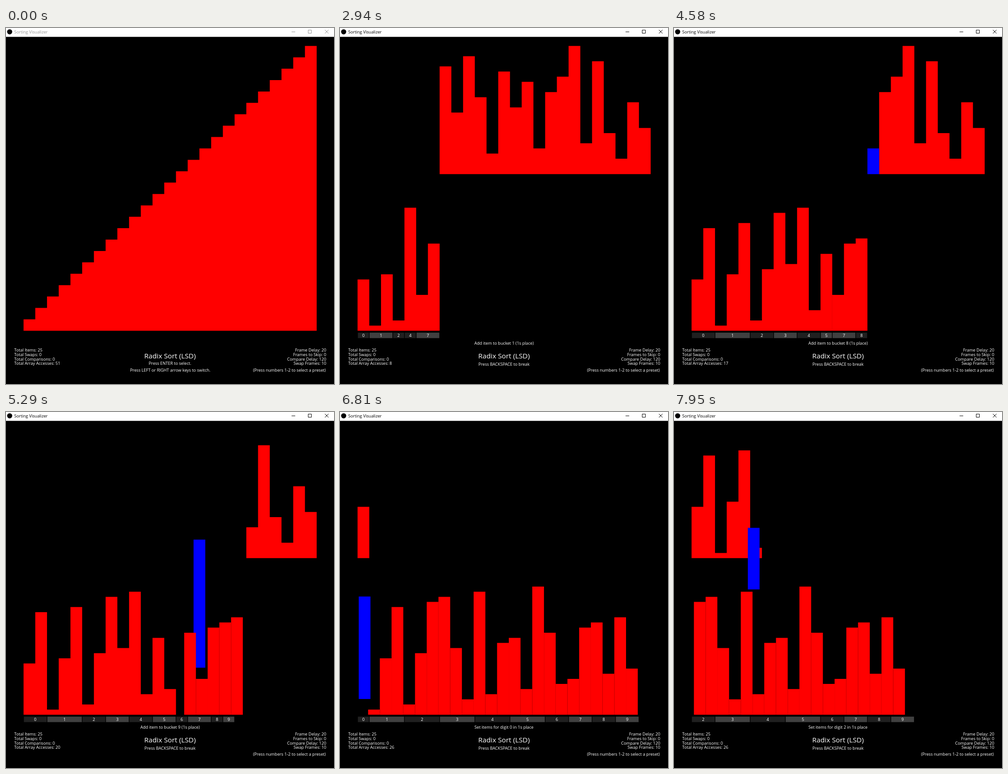
These frames come from a looping animation (719x779 px, 7990 ms). An HTML page with a canvas:

```html
<!DOCTYPE html>
<html lang="en">
<head>
<meta charset="utf-8">
<title>Sorting Visualizer</title>
<style>
html, body { margin: 0; width: 100%; height: 100%; overflow: hidden; background: #000; }
canvas { display: block; }
</style>
</head>
<body>
<canvas id="stage" width="719" height="779"></canvas>
<script>
const ctx = document.getElementById('stage').getContext('2d');
const LOOP = 7990, SHUFFLE_AT = 700, SORT_AT = 1560;
const ADD = { start: 1547, tick: 16.775 }, SET = { start: 6580, tick: 17 };
const TICKS = 12, MOVE_STEPS = 10;
const LEFT = 38.5, SLOT = 25.7, TOP = 39.2, FLOOR = 662.4;
const FULL = (FLOOR - TOP) / 25, HALF = FULL * 0.45, SHELF = TOP + HALF * 25;
const RED = '#f00', BLUE = '#00f';

const items = [7, 10, 17, 1, 2, 24, 11, 21, 12, 23, 15, 4, 20,
  13, 18, 5, 16, 19, 25, 6, 22, 8, 3, 14, 9];
const ordered = items.map((_, i) => i + 1);
const digit = v => v % 10;
const byDigit = list => [...list].sort((a, b) => digit(a) - digit(b));
const buckets = byDigit(items);
const lerp = (a, b, q) => a + (b - a) * q;
const clamp = (v, lo, hi) => Math.min(hi, Math.max(lo, v));

function text(str, x, y, align = 'left', size = 9.15, color = '#fff') {
  ctx.font = `${size}px "Open Sans", "Noto Sans", sans-serif`;
  ctx.textAlign = align;
  ctx.fillStyle = color;
  ctx.fillText(str, x, y);
}

// One path for the whole run, so that neighbours join without seams.
function bars(values, slot, base, unit = HALF, color = RED) {
  ctx.fillStyle = color;
  ctx.beginPath();
  values.forEach((v, i) =>
    ctx.rect(LEFT + (slot + i) * SLOT, base - v * unit, SLOT, v * unit));
  ctx.fill();
}

// Bars between two slots are painted one by one and show fine seams.
function slidingBars(values, slot, base) {
  if (Number.isInteger(slot)) bars(values, slot, base);
  else values.forEach((v, i) => bars([v], slot + i, base));
}

function bucketLabels(list) {
  for (let d = 0; d < 10; d++) {
    const first = list.findIndex(v => digit(v) === d);
    if (first < 0) continue;
    const width = list.filter(v => digit(v) === d).length * SLOT;
    const x = LEFT + first * SLOT;
    ctx.fillStyle = d % 2 ? '#404040' : '#202020';
    ctx.fillRect(x + 0.7, 666.6, width - 1.4, 12);
    text(d, x + width / 2, 676, 'center');
  }
}

function titleBar(t) {
  const fade = t < 70 ? 0 : clamp((Math.floor((t - 70) / 48.5) + 1) / 8, 0, 1);
  const shade = Math.round(lerp(150, 0, fade));
  const color = `rgb(${shade},${shade},${shade})`;
  ctx.fillStyle = '#fff';
  ctx.fillRect(0, 0, 719, 19.4);
  ctx.fillStyle = '#000';
  ctx.beginPath();
  ctx.arc(8, 8.3, 5.6, 0, 7);
  ctx.fill();
  text('Sorting Visualizer', 18, 12, 'left', 9.15, color);
  ctx.strokeStyle = color;
  ctx.lineWidth = 1;
  ctx.beginPath();
  ctx.moveTo(626, 8.5); ctx.lineTo(634, 8.5);
  ctx.rect(662.5, 4.5, 7, 7);
  ctx.moveTo(699, 4); ctx.lineTo(707, 12);
  ctx.moveTo(707, 4); ctx.lineTo(699, 12);
  ctx.stroke();
}

function footer(accesses, sorting, message) {
  const rows = [708.4, 718, 727.6, 737];
  ['Total Items: 25', 'Total Swaps: 0', 'Total Comparisons: 0', `Total Array Accesses: ${accesses}`]
    .forEach((s, i) => text(s, 18, rows[i]));
  ['Frame Delay: 20', 'Frames to Skip: 0', 'Compare Delay: 120', 'Swap Frames: 10']
    .forEach((s, i) => text(s, 702, rows[i], 'right'));
  text('(Press numbers 1-2 to select a preset)', 701, 751.5, 'right');
  text('Radix Sort (LSD)', 359.5, 723, 'center', 15.3);
  if (sorting) {
    text(message, 359.5, 693, 'center');
    text('Press BACKSPACE to break', 359.5, 739, 'center');
  } else {
    text('Press ENTER to select.', 359.5, 737, 'center');
    text('Press LEFT or RIGHT arrow keys to switch.', 360, 751.5, 'center');
  }
}

function progress(phase, t) {
  const ticks = Math.floor((t - phase.start) / phase.tick);
  const step = ticks % TICKS;
  return {
    index: Math.floor(ticks / TICKS),
    q: Math.min(step, MOVE_STEPS) / MOVE_STEPS,
    done: step > MOVE_STEPS
  };
}

function addPhase(t) {
  const { index, q, done } = progress(ADD, t);
  const moving = items[index];
  const next = byDigit(items.slice(0, index + 1));
  const place = next.indexOf(moving);
  bars(items.slice(index + 1), index + 1, SHELF);
  if (done) bars(next, 0, FLOOR);
  else {
    bars(next.slice(0, place), 0, FLOOR);
    bars([moving], lerp(index, place, q), lerp(SHELF, FLOOR, q), HALF, BLUE);
    slidingBars(next.slice(place + 1), place + q, FLOOR);
  }
  bucketLabels(done ? next : next.filter(v => v !== moving));
  const latest = done ? moving : items[index - 1];
  footer(index + 2, true, latest
    ? `Add item to bucket ${digit(latest)} (1s place)`
    : 'Set items for digit 2 in 10s place');
}

function setPhase(t) {
  const { index, q, done } = progress(SET, t);
  const placed = done ? index + 1 : index;
  slidingBars(buckets.slice(index + 1), 1 - q, FLOOR);
  bars(buckets.slice(0, placed), 0, SHELF);
  if (!done) bars([buckets[index]], lerp(0, index, q), lerp(FLOOR, SHELF, q), HALF, BLUE);
  bucketLabels(buckets.slice(placed));
  const latest = buckets[placed - 1];
  footer(26, true, latest
    ? `Set items for digit ${digit(latest)} in 1s place`
    : 'Add item to bucket 9 (1s place)');
}

function draw(t) {
  ctx.fillStyle = '#000';
  ctx.fillRect(0, 0, 719, 779);
  titleBar(t);
  if (t < SORT_AT) {
    const shuffled = t >= SHUFFLE_AT;
    bars(shuffled ? items : ordered, 0, FLOOR, FULL);
    footer(shuffled ? 0 : 51, false);
  } else if (t < SET.start) addPhase(t);
  else setPhase(t);
}

const begin = performance.now();
function frame() {
  draw((performance.now() - begin) % LOOP);
  requestAnimationFrame(frame);
}
frame();
</script>
</body>
</html>
```
